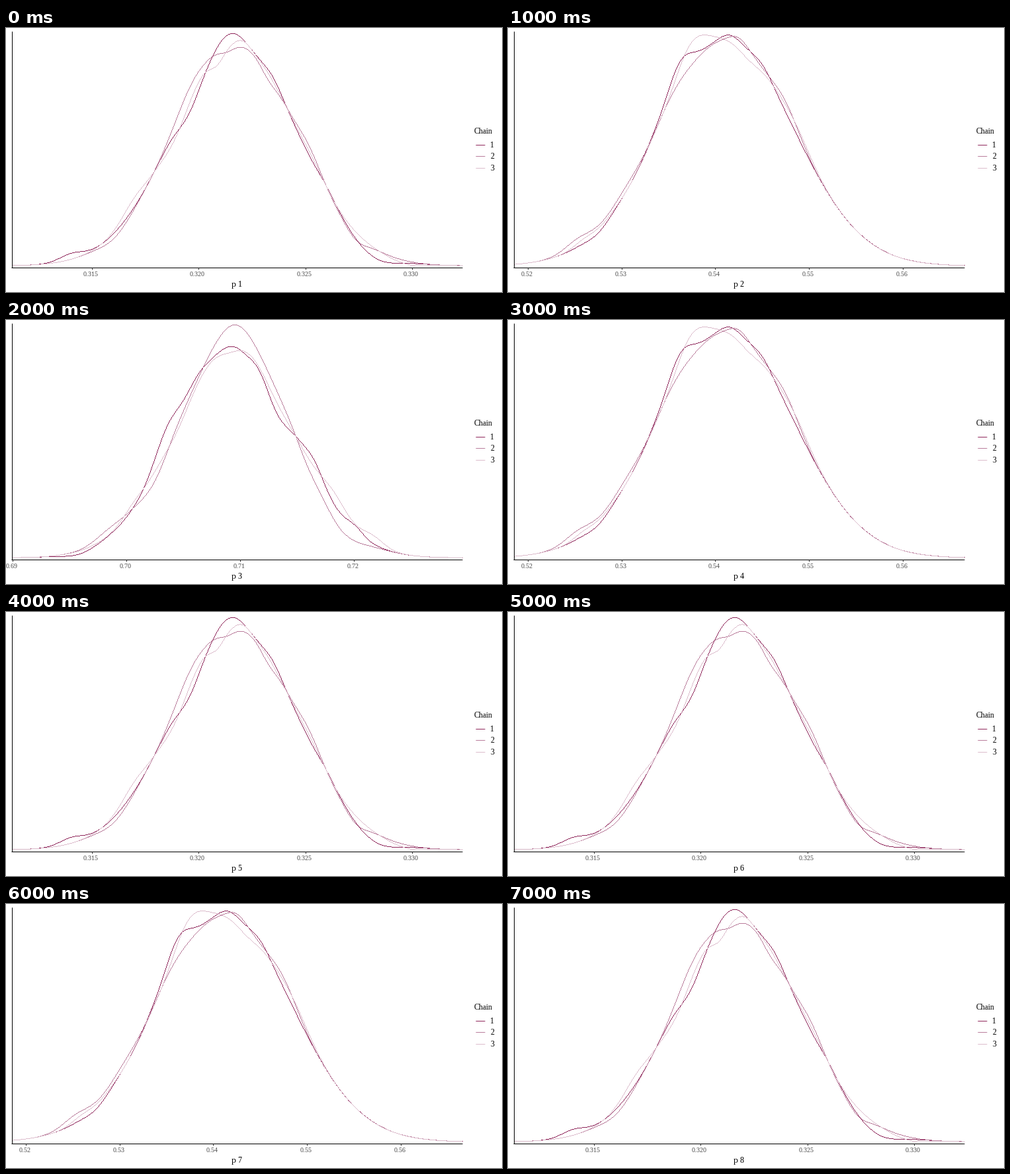
Write a matplotlib script that moves like this. It is 750 px wide and 400 px high and loops after 8000 ms.

```python
import numpy as np
import matplotlib.pyplot as plt
from matplotlib.animation import FuncAnimation
from matplotlib.collections import PolyCollection

W, H, DPI = 750, 400, 100
PX = 72 / DPI  # points per pixel
LEFT, RIGHT, BASE = 9, 690, 360
COLORS = ["#8f275b", "#b97c9b", "#dcbccc"]
CELL = np.array([(0, 0), (1, 0), (1, 1), (0, 1)])

plt.rcParams.update({"font.family": "Liberation Serif",
                     "text.hinting": "native", "text.hinting_factor": 1})


def bell(x, center, width, height):
    return height * np.exp(-((x - center) / width) ** 2 / 2)


def trace(main, bumps):
    """Unit cells of a one-pixel line along a bell with small bumps."""
    x = np.linspace(LEFT, RIGHT, 3000)
    rise = bell(x, *main) + sum(bell(x, *b) for b in bumps)
    y = BASE - np.maximum(rise, 0)
    step = np.maximum(np.abs(np.diff(x)), np.abs(np.diff(y)))
    s = np.append(0, np.cumsum(step))
    at = np.arange(0, s[-1])
    pixels = np.column_stack([np.interp(at, s, x), np.interp(at, s, y)])
    return np.round(pixels)[:, None] + CELL


def panel(ticks, main, *chains):
    x0, gap, first, step, digits = ticks
    count = int((RIGHT - x0) / gap) + 1
    marks = [(round(x0 + gap * k), f"{first + step * k:.{digits}f}")
             for k in range(count)]
    return marks, [trace(main, bumps) for bumps in chains]


# Each main bell and each bump is (center, width, height) in pixels.
narrow = panel(
    (129, 161.4, 0.315, 0.005, 3), (346.5, 94, 335),
    [(98, 18, 9), (277, 17, -23), (338, 19, 18), (404, 12, 7),
     (484, 16, 7), (555, 30, -15)],
    [(165, 20, -8), (280, 22, 15), (335, 12, -9), (396, 12, -10),
     (459, 18, 16), (528, 16, -12)],
    [(192, 18, 14), (256, 18, -17), (319, 11, -17), (357, 11, 8),
     (465, 20, 8), (610, 25, -5)])

middle = panel(
    (29, 141.75, 0.52, 0.01, 2), (330, 102, 342),
    [(136, 16, -6), (218, 14, 6), (258, 19, 40), (335, 14, 8), (385, 14, 8)],
    [(105, 20, 12), (175, 22, 8), (245, 25, 13), (348, 13, 9), (420, 19, 16)],
    [(112, 14, 5), (222, 14, 5), (275, 23, 40), (361, 18, -12),
     (433, 22, 13)])

wide = panel(
    (9, 172, 0.69, 0.01, 2), (345, 90, 322),
    [(110, 22, -5), (243, 19, 30), (288, 14, 10), (364, 12, -8),
     (409, 17, -31), (466, 14, 17), (527, 12, 8)],
    [(155, 22, 10), (225, 18, -15), (346, 30, 31), (455, 14, -8),
     (505, 28, -22)],
    [(192, 15, 8), (260, 18, -11), (338, 15, -10), (409, 22, -15),
     (495, 20, 20), (553, 18, 13)])

panels = [narrow, middle, wide, middle, narrow, narrow, middle, narrow]

fig = plt.figure(figsize=(W / DPI, H / DPI), dpi=DPI, facecolor="white")
ax = fig.add_axes([0, 0, 1, 1])
ax.set_xlim(0, W)
ax.set_ylim(H, 0)
ax.axis("off")


def line(xs=(), ys=(), color="black"):
    return ax.plot(xs, ys, color=color, lw=PX, solid_capstyle="butt",
                   snap=True, zorder=3)[0]


def label(x, y, text, size, color="black", ha="left"):
    return ax.text(x, y, text, fontsize=size * PX, color=color, ha=ha,
                   va="baseline")


chains = [ax.add_collection(PolyCollection([], facecolor=c, edgecolor="none",
                                           linewidth=0), autolim=False)
          for c in COLORS]

line([8.5, 8.5], [5, 363])
line([8, 690], [362.5, 362.5])

label(708, 160, "Chain", 12)
for i, c in enumerate(COLORS):
    drop = int(17.28 * i + 0.5)
    line([710, 724], [176.5 + drop] * 2, c)
    label(732, 181 + drop, str(i + 1), 12)

slots = max(len(marks) for marks, _ in panels)
ticks = [line(color="#333333") for _ in range(slots)]
names = [label(0, 376, "", 10, "#4d4d4d", "center") for _ in range(slots)]
title = label(341, 392, "", 13)


def draw(i):
    marks, curves = panels[i]
    for chain, cells in zip(chains, curves):
        chain.set_verts(cells)
    for k, (tick, name) in enumerate(zip(ticks, names)):
        shown = k < len(marks)
        tick.set_visible(shown)
        name.set_visible(shown)
        if shown:
            x, text = marks[k]
            tick.set_data([x + 0.5] * 2, [363, 366])
            name.set_x(x - 0.5)
            name.set_text(text)
    title.set_text(f"p {i + 1}")
    return chains + ticks + names + [title]


anim = FuncAnimation(fig, draw, frames=len(panels), interval=1000,
                     repeat=True, repeat_delay=0, blit=False)
plt.show()
```
